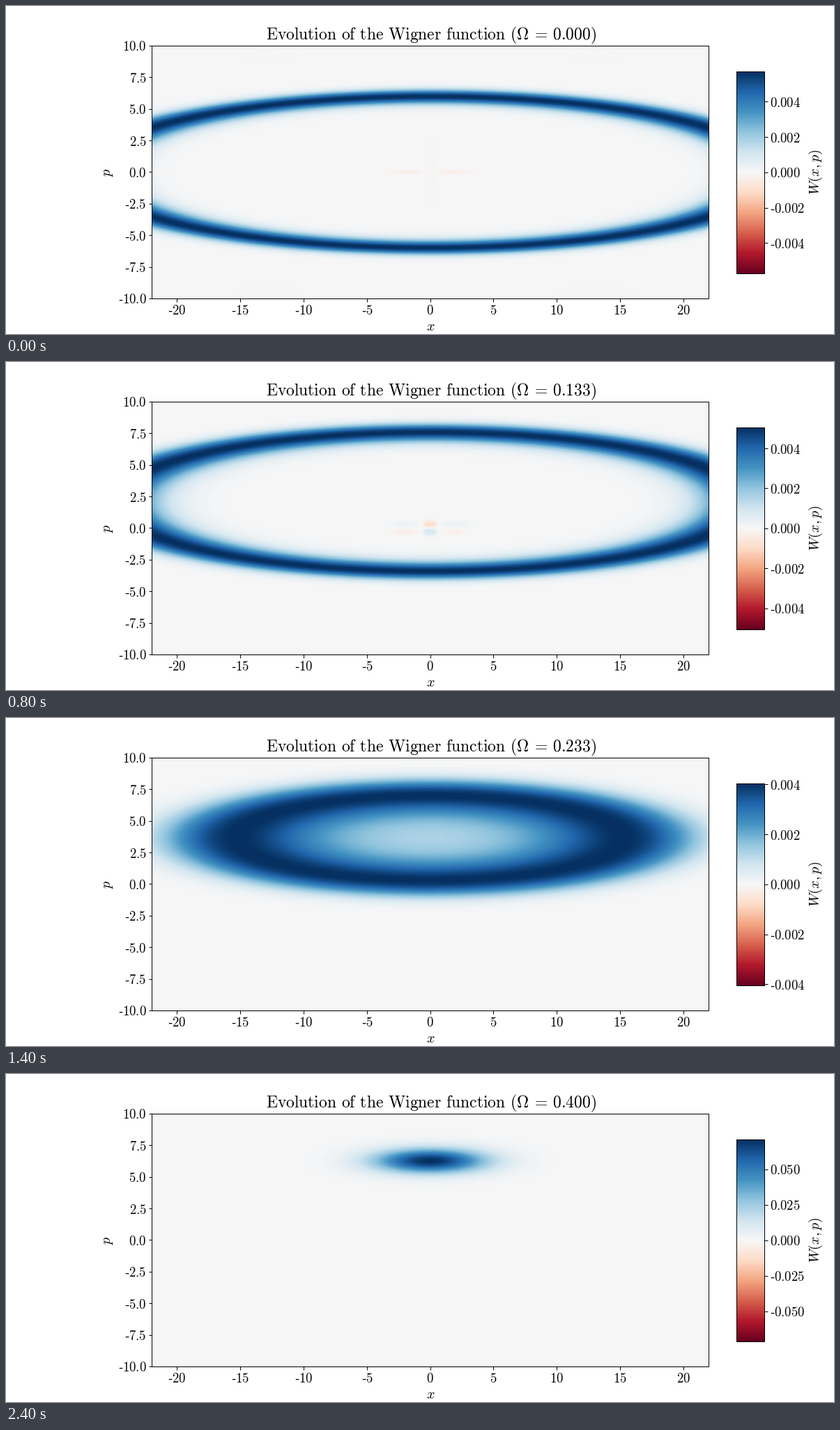
A matplotlib script for the animation above (2.5 s loop, 1188 px wide and 471 px high).

```python
import numpy as np
import matplotlib.pyplot as plt
from matplotlib.animation import FuncAnimation
from matplotlib.ticker import FuncFormatter, MaxNLocator

plt.rcParams["mathtext.fontset"] = "cm"

W, H, DPI = 1188, 471, 96
FRAMES, INTERVAL = 25, 100
PT = 72 / DPI           # points per pixel
SQUEEZE = 4.54          # x to p axis ratio of the orbit
SPACE = r"\hspace{0.38}"


def rm(text):
    """Upright Computer Modern with a text hyphen as minus."""
    return r"$\mathrm{" + text.replace("-", "\u2010") + "}$"


def box(left, top, right, bottom):
    return [left / W, 1 - bottom / H, (right - left) / W, (bottom - top) / H]


def label(x, y, text, size, **kw):
    return fig.text(x / W, 1 - y / H, text, fontsize=size * PT,
                    ha="center", **kw)


def title_text(omega):
    words = SPACE.join("Evolution of the Wigner function (".split())
    return (r"$\mathrm{" + words + r"}\Omega\hspace{0.2}=\hspace{0.2}"
            + r"\mathrm{" + f"{omega:.3f})" + "}$")


x = np.linspace(-22, 22, 881)[None, :]
p = np.linspace(-10, 10, 401)[:, None]
ax_, ap = np.abs(x), np.abs(p)
u_line = np.linspace(0, 120, 6001)


def orbit(i):
    """Ring-shaped state that shrinks to a spot; returns field and peak."""
    n = (i / 4) ** 2
    gain = 4.925 / (1 + n / 34.2) - 3.42
    sat = 0.0418 / (1 + 0.06 * n + 0.0022 * n**2 + 0.00012 * n**3)
    top = max(gain, 0) ** 2 / (2 * sat)

    def shape(u):
        return np.exp(gain * u - sat * u * u / 2 - top)

    area = shape(u_line).sum() * (u_line[1] - u_line[0])
    peak = 1 / (np.pi * SQUEEZE * area)
    shift = 0.2618 * i
    return peak * shape((x / SQUEEZE) ** 2 + (p - shift) ** 2), peak


def fringes(i):
    """Weak interference near the origin and the far corners."""
    k = i / 4
    fade = np.exp(-3 * k * k)
    odd = p / 0.28 * np.exp(0.5 - (p / 0.28) ** 2 / 2)
    core = np.exp(-(x / 0.56) ** 4)
    wing = np.exp(-((ax_ - 2) / 1.1) ** 2)
    swing = 0.4 * k * np.exp(0.5 * (1 - k * k))
    out = swing * odd * (0.32 * wing - core)
    streak = np.exp(-(p / 0.18) ** 2 - ((ax_ - 1.8) / 1.4) ** 2)
    beads = np.cos(2 * np.pi * p / 0.8) * np.exp(-(p / 2.5) ** 2) * core
    out = out + fade * (0.03 * beads - 0.07 * streak)
    r = np.hypot((ax_ - 13) / 1.6, ap - 10.5)
    ripple = np.cos(14 * r) * np.exp(-(r / 1.8) ** 2)
    return out + 0.03 * np.exp(-1.5 * k) * ripple


fig = plt.figure(figsize=(W / DPI, H / DPI), dpi=DPI, facecolor="white")
ax = fig.add_axes(box(209.1, 56.9, 1008.1, 419.9))
cax = fig.add_axes(box(1048.1, 93.9, 1088.1, 383.9))

im = ax.imshow(np.zeros((p.size, x.size)), cmap="RdBu", origin="lower",
               extent=(-22, 22, -10, 10), aspect="auto",
               interpolation="bilinear", vmin=-1, vmax=1)
ax.set_xticks(np.arange(-20, 21, 5))
ax.set_yticks(np.arange(-10, 10.1, 2.5))
ax.xaxis.set_major_formatter(FuncFormatter(lambda v, _: rm(f"{v:.0f}")))
ax.yaxis.set_major_formatter(FuncFormatter(lambda v, _: rm(f"{v:.1f}")))

cbar = fig.colorbar(im, cax=cax)
tick = dict(length=4.5 * PT, width=PT, labelsize=18.67 * PT)
ax.tick_params(axis="x", pad=3.8 * PT, **tick)
ax.tick_params(axis="y", pad=3.2 * PT, **tick)
cax.tick_params(axis="y", pad=3 * PT, **tick)
cbar.outline.set_linewidth(PT)
for spine in ax.spines.values():
    spine.set_linewidth(PT)

title = label(609.7, 48, title_text(0), 23.55, va="baseline")
label(609, 460, "$x$", 20, va="center")
label(146.5, 238.5, "$p$", 20, va="center", rotation=90)
w_label = label(1161.5, 238.5, "$W(x,p)$", 20, va="center", rotation=90)
locator = MaxNLocator(7, steps=[1, 2, 2.5, 5, 10])


def set_scale(peak):
    im.set_clim(-peak, peak)
    ticks = [t for t in locator.tick_values(-peak, peak) if abs(t) <= peak]
    step = ticks[1] - ticks[0]
    digits = next(d for d in range(2, 7) if abs(round(step, d) - step) < 1e-9)
    ticks = [round(t, digits) + 0.0 for t in ticks]
    cbar.set_ticks(ticks, labels=[rm(f"{t:.{digits}f}") for t in ticks])
    w_label.set_x((1161.5 + 9.2 * (digits - 3)) / W)


def update(i):
    field, peak = orbit(i)
    # the small lift keeps empty areas on the blue side of the midpoint
    im.set_data(field + peak * (fringes(i) + 0.002))
    set_scale(peak)
    title.set_text(title_text(0.4 * i / (FRAMES - 1)))
    return im, title, w_label


anim = FuncAnimation(fig, update, frames=FRAMES, interval=INTERVAL,
                     init_func=lambda: update(0), repeat=True,
                     repeat_delay=0, blit=False)
plt.show()
```
